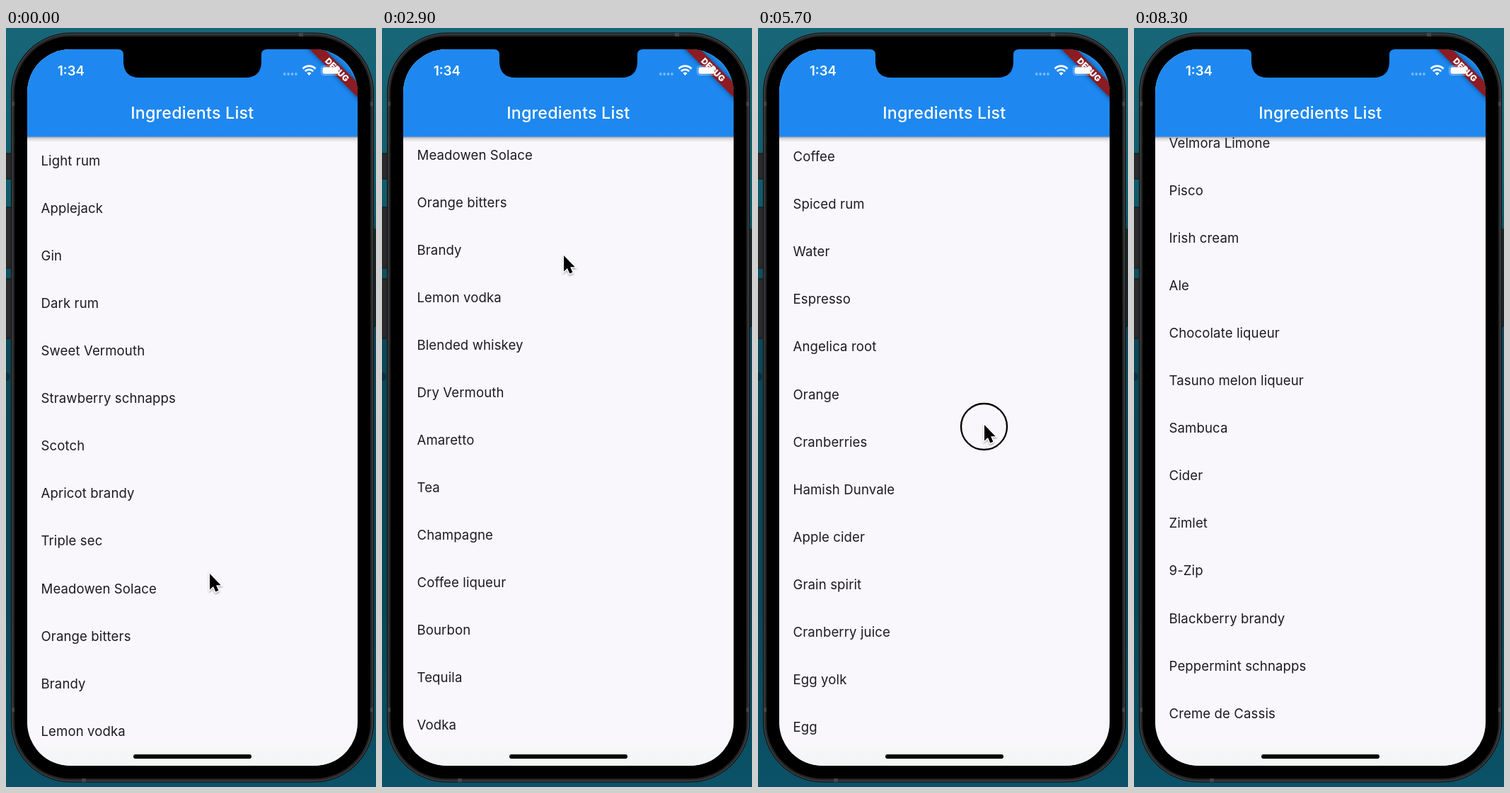
These frames come from a looping animation (523 by 1071 pixels, 8.4 s). An HTML page:

```html
<!DOCTYPE html>
<html lang="en">
<head>
<meta charset="utf-8">
<title>Ingredients List</title>
<style>
html, body { margin: 0; height: 100%; overflow: hidden; background: #0e4f61; }
svg { display: block; width: 100vw; height: 100vh; }
text { font-family: Inter, "Open Sans", sans-serif; }
#list text { font-size: 18.6px; letter-spacing: .1px; fill: #1d1b20; }
</style>
</head>
<body>
<svg viewBox="0 0 523 1071">
  <defs>
    <linearGradient id="sea" x2="0" y2="1">
      <stop offset="0" stop-color="#176677"/>
      <stop offset=".2" stop-color="#105c6c"/>
      <stop offset=".4" stop-color="#0d4654"/>
      <stop offset=".75" stop-color="#0b4554"/>
      <stop offset="1" stop-color="#0b5268"/>
    </linearGradient>
    <linearGradient id="shade" x2="0" y2="1">
      <stop offset="0" stop-opacity=".36"/>
      <stop offset=".4" stop-opacity=".13"/>
      <stop offset="1" stop-opacity="0"/>
    </linearGradient>
    <linearGradient id="foot" x2="0" y2="1">
      <stop offset="0" stop-color="#f2f5f5" stop-opacity="0"/>
      <stop offset="1" stop-color="#f2f5f5"/>
    </linearGradient>
    <clipPath id="screen"><rect x="30" y="30" width="467" height="1011" rx="61"/></clipPath>
    <filter id="blur" x="-20%" y="-150%" width="140%" height="400%"><feGaussianBlur stdDeviation="3.5"/></filter>
    <filter id="drop" x="-50%" y="-50%" width="200%" height="200%">
      <feDropShadow dx="0" dy="1.5" stdDeviation="1.3" flood-opacity=".4"/>
    </filter>
  </defs>

  <rect width="523" height="1071" fill="url(#sea)"/>
  <circle cx="0" cy="492" r="6" fill="#0a2f3d"/>

  <!-- phone body -->
  <g fill="#29292b" stroke="#111" stroke-width="1">
    <rect x="-4" y="177" width="12" height="36" rx="2"/>
    <rect x="-4" y="253" width="12" height="86" rx="2"/>
    <rect x="-4" y="354" width="12" height="84" rx="2"/>
    <rect x="516" y="283" width="6" height="139" rx="2"/>
  </g>
  <rect x="7.5" y="7" width="512" height="1057" rx="84" fill="#252527" stroke="#101012"/>
  <rect x="9" y="8.5" width="509" height="1054" rx="82.5" fill="none" stroke="#4b4b4e"/>
  <path d="M8 107h5M8 962h5M514 107h5M514 962h5M110 1059v5M417 7v5" stroke="#454548" stroke-width="6"/>
  <rect x="12" y="12" width="503" height="1047" rx="79"/>

  <g clip-path="url(#screen)">
    <rect x="30" y="30" width="467" height="1011" fill="#f9f7fb"/>
    <rect x="30" y="1005" width="467" height="36" fill="url(#foot)"/>
    <g id="list"></g>
    <rect x="30" y="153" width="467" height="8" fill="url(#shade)"/>
    <rect x="30" y="30" width="467" height="123.5" fill="#1e88f0"/>
    <text x="263.3" y="128.2" text-anchor="middle" font-size="23.3" font-weight="500" letter-spacing=".2" fill="#fff">Ingredients List</text>
    <g transform="translate(497 30) rotate(45)">
      <rect x="-60" y="33.5" width="120" height="14.4" filter="url(#blur)" opacity=".55"/>
      <rect x="-60" y="33.5" width="120" height="14.4" fill="#8d1b22"/>
      <text y="45.1" text-anchor="middle" font-size="12" font-weight="900" fill="#fff">DEBUG</text>
    </g>
    <path d="M158 29v1q8 0 8 8v9q0 23 23 23h149q23 0 23-23v-9q0-8 8-8v-1z"/>
    <text x="73" y="66.5" font-size="18.5" font-weight="600" fill="#fff">1:34</text>
    <g fill="#fff" fill-opacity=".4">
      <circle cx="393.8" cy="65" r="1.9"/><circle cx="399.2" cy="65" r="1.9"/>
      <circle cx="404.6" cy="65" r="1.9"/><circle cx="410" cy="65" r="1.9"/>
    </g>
    <g fill="none" stroke="#fff" stroke-width="2.8">
      <path d="M419.6 57.4a12.6 12.6 0 0 1 17.8 0M422.8 61a8.1 8.1 0 0 1 11.4 0"/>
      <path d="M428.5 67l-3-3.2a4.2 4.2 0 0 1 6 0z" fill="#fff" stroke="none"/>
    </g>
    <rect x="445.6" y="53.6" width="26" height="12.8" rx="4" fill="none" stroke="#fff" stroke-opacity=".4" stroke-width="1.2"/>
    <rect x="447.4" y="55.3" width="22.4" height="9.4" rx="2.5" fill="#fff"/>
    <path d="M473 58q2 2 0 4z" fill="#fff" fill-opacity=".45"/>
    <rect x="180" y="1025" width="167" height="6" rx="3"/>
  </g>

  <g id="pointer">
    <circle id="ring" cx="-.5" cy="2.5" r="32.5" fill="none" stroke="#000" stroke-width="2.3"/>
    <path d="M0 0v22.6l5-4.7 3.3 7.7 4.1-1.8-3.3-7.5h6.6z" stroke="#fff" stroke-width="2.6" paint-order="stroke" filter="url(#drop)"/>
  </g>
</svg>
<script>
const $ = id => document.getElementById(id);
const LOOP = 8400, STEP = 100, ROW = 67.08;

const items = `Light rum,Applejack,Gin,Dark rum,Sweet Vermouth,Strawberry schnapps,Scotch,Apricot brandy,Triple sec,
Meadowen Solace,Orange bitters,Brandy,Lemon vodka,Blended whiskey,Dry Vermouth,Amaretto,Tea,Champagne,Coffee liqueur,
Bourbon,Tequila,Vodka,Añejo rum,Bitters,Sugar,Tamelo,demerara Sugar,Valdorin Rouge,Watermelon,Lime juice,Irish whiskey,
Apple brandy,Carbonated water,Cherry brandy,Creme de Cacao,Grenadine,Port,Coffee brandy,Red wine,Rum,Grapefruit juice,
Vorand,Sherry,Cognac,Sloe gin,Apple juice,Pineapple juice,Lemon juice,Sugar syrup,Milk,Strawberries,Chocolate syrup,
Yoghurt,Mango,Ginger,Lime,Cantaloupe,Berries,Grapes,Kiwi,Tomato juice,Cocoa powder,Chocolate,Heavy cream,Castrelo,
Peach Vodka,Ouzo,Coffee,Spiced rum,Water,Espresso,Angelica root,Orange,Cranberries,Hamish Dunvale,Apple cider,
Grain spirit,Cranberry juice,Egg yolk,Egg,Grape juice,Peach nectar,Lemon,Firewater,Lemonade,Lager,Whiskey,
Velmora Limone,Pisco,Irish cream,Ale,Chocolate liqueur,Tasuno melon liqueur,Sambuca,Cider,Zimlet,9-Zip,
Blackberry brandy,Peppermint schnapps,Creme de Cassis`.split(/,\s*/);

$('list').innerHTML = items.map((name, i) =>
  `<text x="49.5" y="${(193.8 + i * ROW).toFixed(2)}">${name}</text>`).join('');

// [time, offset]
const scroll = [[0, 0], [1300, 0], [1800, 218.3], [2300, 455], [2900, 612], [3300, 640], [3600, 1080],
  [4000, 2245], [4500, 3060], [4900, 3357], [5300, 3680], [5700, 4500], [6400, 5606], [6800, 5880], [7200, 5861]];
// [time, x, y]
const path = [[0, 288, 770], [800, 288, 770], [1200, 288, 787], [1300, 288, 786], [1800, 281, 568],
  [2300, 262, 360], [2900, 257, 321], [3300, 275, 560], [3800, 252, 200], [4000, 252, 182], [4700, 289, 558],
  [4900, 289, 553], [5250, 300, 260], [5700, 320, 560], [6050, 339, 320], [6400, 339, 293], [7000, 430, 420], [7600, 570, 600]];
const presses = [[1200, 2300], [3300, 3800], [4800, 5200], [5700, 6050]];

// Monotone cubic through column c of the keys
function at(keys, t, c) {
  const n = keys.findIndex(k => k[0] > t);
  if (n < 0) return keys.at(-1)[c];
  const slope = i => keys[i] && keys[i - 1] ? (keys[i][c] - keys[i - 1][c]) / (keys[i][0] - keys[i - 1][0]) : 0;
  const tangent = i => {
    const a = slope(i), b = slope(i + 1);
    return a * b > 0 ? 2 * a * b / (a + b) : 0;
  };
  const p = keys[n - 1], q = keys[n], d = q[0] - p[0], u = (t - p[0]) / d, v = 1 - u;
  return v * v * (1 + 2 * u) * p[c] + u * u * (3 - 2 * u) * q[c]
    + d * u * v * (v * tangent(n - 1) - u * tangent(n));
}

function draw(now) {
  const t = Math.floor(now % LOOP / STEP) * STEP;
  $('list').setAttribute('transform', `translate(0 ${-at(scroll, t, 1)})`);
  $('pointer').setAttribute('transform', `translate(${at(path, t, 1)} ${at(path, t, 2)})`);
  $('ring').style.display = presses.some(([a, b]) => t >= a && t < b) ? '' : 'none';
  requestAnimationFrame(draw);
}
draw(performance.now());
</script>
</body>
</html>
```
